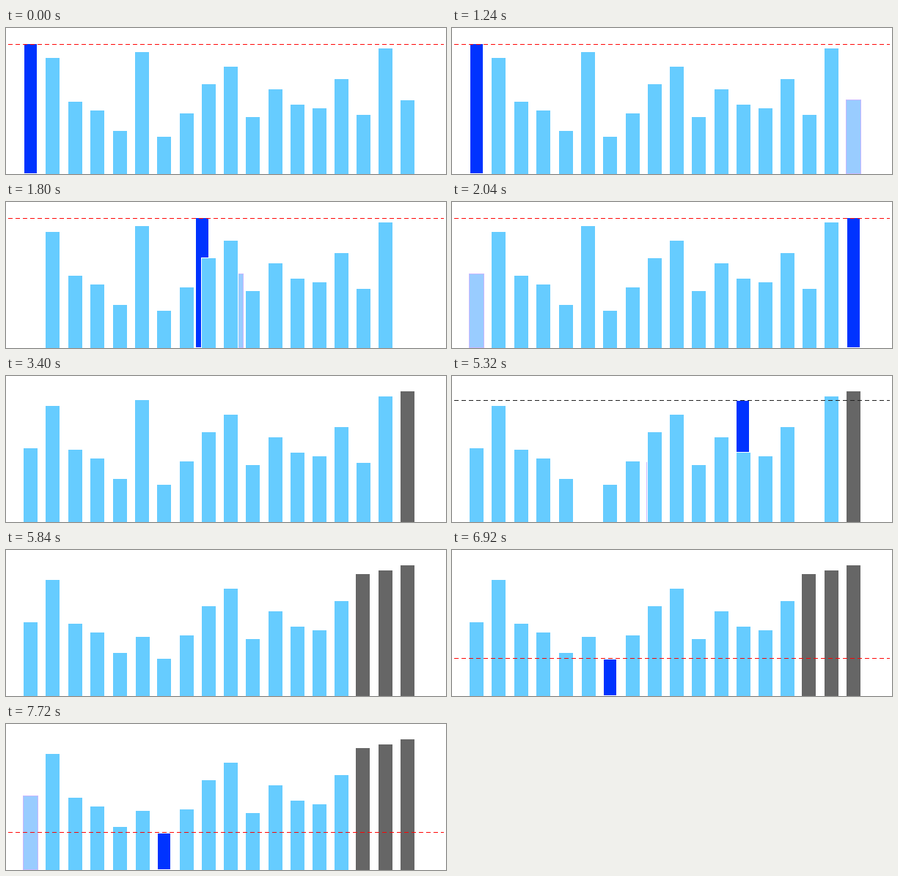
Animation, 600 px wide and 200 px high, one loop 8 s. Source, as an HTML page with a canvas:

```html
<!DOCTYPE html>
<html lang="en">
<head>
<meta charset="utf-8">
<title>Selection sort</title>
<style>
  html, body { margin: 0; width: 100%; height: 100%; overflow: hidden; background: #fff; }
  canvas { display: block; }
</style>
</head>
<body>
<canvas id="stage" width="600" height="200"></canvas>
<script>
const ctx = document.getElementById('stage').getContext('2d');
const LOOP = 8000, STEP = 40, FLOOR = 200, BAR_W = 19;
const LIGHT = '#66ccff', GREY = '#666666', BLUE = '#0033ff';
const PALE = '#99ccff', PALE_EDGE = '#c8b8ff';
const RED = '#ff0000', DARK = '#222222';

const slots = [24, 54, 85, 115, 146, 176, 206, 237, 267, 297, 327, 358, 388, 418, 448, 478, 508, 538];
const tops = [21, 41, 101, 113, 141, 33, 149, 117, 77, 53, 122, 84, 105, 110, 70, 119, 28, 99];

function rect(x, y, w, bottom, color) {
  ctx.fillStyle = color;
  ctx.fillRect(x, y, w, bottom - y);
}

// Resting bars carry a white outline that shows over moving ones.
function drawBar(x, top, color) {
  rect(x - 1, top - 1, BAR_W + 2, FLOOR, '#fff');
  rect(x, top, BAR_W, FLOOR, color);
}

function drawPale(x, top) {
  x = Math.round(x);
  rect(x, top, 21, FLOOR, PALE_EDGE);
  rect(x + 1, top + 1, 19, FLOOR - 1, PALE);
}

function drawBlue(x, top) {
  x = Math.round(x);
  rect(x - 1, top - 1, 19, FLOOR, '#fff');
  rect(x, top, 17, FLOOR - 1, BLUE);
}

function drawLine(y, color) {
  for (let x = 3; x < 597; x += 10) rect(x, y, Math.min(6, 597 - x), y + 1, color);
}

// Share of a swap done, in whole steps.
function progress(t, start, steps) {
  const k = Math.floor((t - start) / STEP) + 1;
  return Math.max(0, Math.min(steps, k)) / steps;
}

const mix = (a, b, p) => a + (b - a) * p;

function draw(t) {
  const bars = slots.map((x, i) => ({ x, top: tops[i], color: LIGHT }));
  const hide = (...ids) => ids.forEach(i => { bars[i].hidden = true; });
  let line = null;

  rect(0, 0, 600, FLOOR, '#fff');

  if (t < 3400) {
    const p = progress(t, 1640, 11);
    line = [22, RED];
    hide(0);
    if (t >= 1240) hide(17);
    if (t >= 1240 && t < 2440) drawPale(mix(537, 23, p), 98);
    if (t >= 2440) bars[0] = { x: 24, top: 99, color: LIGHT };
    drawBlue(mix(25, 539, p), 22);
  } else {
    bars[0].top = 99;
    bars[17] = { x: 538, top: 21, color: GREY };

    if (t >= 3920 && t < 5840) {
      const p = progress(t, 5080, 10);
      line = [33, DARK];
      hide(5);
      if (t >= 4720) {
        hide(15);
        drawPale(mix(476, 175, p), 118);
      }
      drawBlue(mix(177, 478, p), 34);
    } else if (t >= 5840) {
      bars[5] = { x: 177, top: 119, color: LIGHT };
      bars[15] = { x: 477, top: 33, color: GREY };
      bars[16].color = GREY;
      if (t >= 6920) {
        line = [148, RED];
        hide(6);
        drawBlue(207, 150);
      }
      if (t >= 7720) {
        hide(0);
        drawPale(23, 98);
      }
    }
  }

  for (const b of bars) if (!b.hidden) drawBar(b.x, b.top, b.color);
  if (line) drawLine(...line);
}

const start = performance.now();
function tick() {
  draw((performance.now() - start) % LOOP);
  requestAnimationFrame(tick);
}
tick();
</script>
</body>
</html>
```
